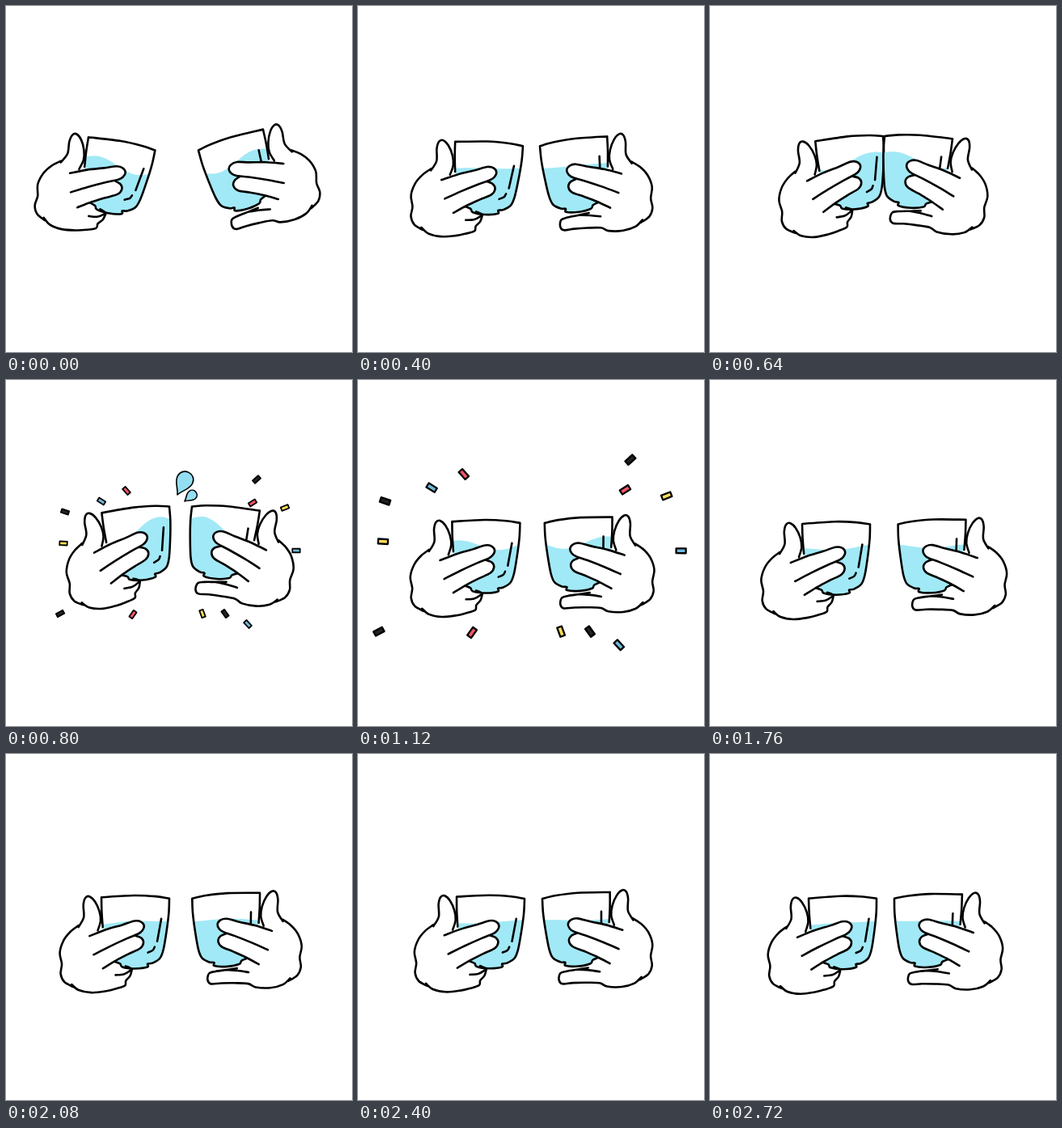
An HTML page with a canvas for the animation above (2800 ms loop, 428 by 428 pixels).

```html
<!DOCTYPE html>
<html lang="en">
<head>
<meta charset="utf-8">
<title>Cheers</title>
<style>
  html, body { margin: 0; width: 100%; height: 100%; overflow: hidden; background: #fff; }
  canvas { display: block; }
</style>
</head>
<body>
<canvas id="stage" width="428" height="428"></canvas>
<script>
const ctx = document.getElementById("stage").getContext("2d");
const LOOP = 2800, STEP = 80, HOLD = 160, CLINK = 640, SPLASH = 800;
const INK = "#000", WATER = "#a1e9f6";
const GLASS_WIDTH = 84;

// One hand and glass, mirrored for the other side.
// Origin: the rim corner nearest the middle of the stage; x runs outwards.
const rim = [0, 0, 17, -2.5, 44, -3.5, 84, -1];
const outerWall = [84, -1, 83, 17, 81, 36];
const innerWall = [66, 78, 58, 81, 55, 85, 40, 87, 24, 85, 24, 81, 18, 80, 9, 74, 5, 63, 2, 41, 0, 18, 0, 0];
const thumb = [111, 36, 105, 24, 106, 9, 104, 0, 99, -2, 92, 4, 86, 16, 84, 28, 87, 40];
const upperFinger = [97, 47, 77, 39, 57, 33, 42, 28, 34, 29, 30, 34, 32, 40, 37, 44, 51, 50, 72, 60, 91, 70];
const lowerFinger = [41, 46, 33, 49, 30, 55, 34, 62, 48, 69, 63, 77, 79, 87];
const palm = [74, 115, 92, 117, 108, 114, 117, 107];
const back = [115, 110, 126, 104, 131, 94, 130, 82, 133, 68, 129, 53, 121, 42, 111, 34];

const sides = [
  { dir: -1, lean: 0.03, tilt: a => a,
    crease: [63, 95, 53, 94, 46, 90, 44, 87, 51, 84],
    little: [43, 88, 45, 96, 50, 102, 51, 108, 62, 112],
    shine: [[9, 25, 13, 53], [16, 60, 18, 64, 24, 67]] },
  { dir: 1, lean: -0.03, tilt: a => 1.3 * a + 3.6,
    crease: [66, 96, 53, 93, 39, 91],
    little: [52, 90, 39, 91, 25, 92, 17, 94, 15, 102, 19, 107, 32, 107, 48, 108, 65, 110],
    shine: [[72, 22, 71, 40]] }
];

// Time, middle x, half of the gap between the glasses, rim height, outward tilt in degrees
const poses = [
  [HOLD, 211.2, 26.8, 178.5, 10.5],
  [400, 214.5, 10.5, 173.3, 3],
  [CLINK, 215, 1, 161, -5],
  [SPLASH, 216, 14, 156.5, -6],
  [1360, 215.5, 15.5, 181.5, 2],
  [1760, 215.3, 17.3, 178.5, -0.3],
  [2400, 217, 11, 179, 1],
  [LOOP, 217, 11, 178.7, -1]
];

const COLOURS = { r: "#f4586a", y: "#ffdc55", b: "#6fb9da", k: "#222" };
// Offsets from the centre of the burst
const bursts = [
  { until: 1360, colours: "bbkyyk", spots: [145, 1, 85, 92, 57, 79, 29, 79, -143, -8, -141, -47] },
  { until: 1280, colours: "rkbrkry", spots: [-57, 80, -147, 79, -96, -60, -65, -73, 96, -87, 91, -58, 131, -52] }
];

const mix = (a, b, k) => a + (b - a) * k;
const easeOut = (k, power) => 1 - (1 - k) ** power;
const radians = deg => deg * Math.PI / 180;

function poseAt(t) {
  const now = Math.max(t, HOLD);
  const next = Math.max(1, poses.findIndex(p => p[0] >= now));
  const a = poses[next - 1], b = poses[next];
  const k = (now - a[0]) / (b[0] - a[0]);
  const eased = a[0] === SPLASH ? easeOut(k, 2) : k;
  return a.map((v, i) => mix(v, b[i], eased));
}

// The water swings over before the splash, then rocks and dies away.
function waveAt(t) {
  const since = t - SPLASH;
  if (since < 0) return { height: mix(-8.5, 12.5, Math.max(0, t - HOLD) / (SPLASH - HOLD)), phase: 0 };
  return { height: 12.5 * Math.exp(-since / 590), phase: since / 560 * 1.5 * Math.PI };
}

// Smooth curve through every point, joined to the current path if asked.
function curve(p, join) {
  const n = p.length / 2;
  const at = i => { const j = 2 * Math.min(n - 1, Math.max(0, i)); return [p[j], p[j + 1]]; };
  ctx[join ? "lineTo" : "moveTo"](p[0], p[1]);
  for (let i = 0; i < n - 1; i++) {
    const [a, b, c, d] = [at(i - 1), at(i), at(i + 1), at(i + 2)];
    ctx.bezierCurveTo(b[0] + (c[0] - a[0]) / 6, b[1] + (c[1] - a[1]) / 6,
      c[0] - (d[0] - b[0]) / 6, c[1] - (d[1] - b[1]) / 6, c[0], c[1]);
  }
}

function stroke(lines) {
  ctx.beginPath();
  lines.forEach(line => curve(line));
  ctx.stroke();
}

function shape(parts) {
  ctx.beginPath();
  parts.forEach((part, i) => curve(part, i > 0));
  ctx.closePath();
}

function drawWater({ height, phase }) {
  ctx.beginPath();
  for (let x = -6; x <= GLASS_WIDTH + 6; x += 3) {
    const u = x / GLASS_WIDTH;
    const level = 27.5 + 5 * u - 0.35 * Math.abs(height);
    ctx.lineTo(x, level + height * Math.sin(5 * (u - 0.5) + phase));
  }
  ctx.lineTo(GLASS_WIDTH + 6, 95);
  ctx.lineTo(-6, 95);
  ctx.fillStyle = WATER;
  ctx.fill();
}

function drawSide(side, [, mid, gap, y, tilt], wave) {
  const glass = [rim, outerWall, innerWall];
  const hand = [thumb, upperFinger, lowerFinger, side.crease, [...side.little, ...palm], back];
  ctx.save();
  ctx.translate(mid + side.dir * gap, y);
  ctx.scale(side.dir, 1);
  ctx.rotate(radians(-side.tilt(tilt)));
  ctx.transform(1, 0, side.lean, 1, 0, 0);
  ctx.strokeStyle = INK;
  ctx.lineWidth = 2.6;

  ctx.save();
  shape(glass);
  ctx.clip();
  drawWater(wave);
  ctx.restore();
  stroke([...glass, ...side.shine]);

  ctx.fillStyle = "#fff";
  shape(hand);
  ctx.fill();
  stroke(hand);
  ctx.restore();
}

function drawConfetti(t) {
  if (t < 720 || t > 1360) return;
  const size = 0.84 + 0.46 * easeOut((t - 720) / 640, 3.2);
  ctx.save();
  ctx.translate(214, 210);
  ctx.scale(size, size);
  ctx.strokeStyle = INK;
  ctx.lineWidth = 1.8;
  for (const { until, colours, spots } of bursts) {
    if (t > until) continue;
    ctx.globalAlpha = t === until ? 0.5 : 1;
    [...colours].forEach((key, i) => {
      const x = spots[2 * i], y = spots[2 * i + 1];
      ctx.save();
      ctx.translate(x, y);
      ctx.rotate(Math.atan2(y, x));
      ctx.beginPath();
      ctx.rect(-4.7, -2.3, 9.4, 4.6);
      ctx.fillStyle = COLOURS[key];
      ctx.fill();
      ctx.stroke();
      ctx.restore();
    });
  }
  ctx.restore();
}

function drawDrop(x, y, length, angle) {
  ctx.save();
  ctx.translate(x, y);
  ctx.rotate(radians(angle));
  ctx.scale(length, length);
  ctx.beginPath();
  ctx.moveTo(0, 0);
  ctx.bezierCurveTo(-0.12, -0.3, -0.36, -0.42, -0.33, -0.7);
  ctx.bezierCurveTo(-0.3, -1.1, 0.3, -1.1, 0.33, -0.7);
  ctx.bezierCurveTo(0.36, -0.42, 0.12, -0.3, 0, 0);
  ctx.closePath();
  ctx.restore();
  ctx.fillStyle = "#94def2";
  ctx.fill();
  ctx.stroke();
}

function drawSplash(t) {
  if (t < 720 || t > 880) return;
  ctx.save();
  ctx.translate(0, (SPLASH - t) * 0.07);
  ctx.globalAlpha = t > SPLASH ? 0.5 : 1;
  ctx.strokeStyle = INK;
  ctx.lineWidth = 1.6;
  drawDrop(212, 142, 31, 27);
  drawDrop(221, 150, 18, 50);
  ctx.restore();
}

function draw(t) {
  const pose = poseAt(t), wave = waveAt(t);
  ctx.fillStyle = "#fff";
  ctx.fillRect(0, 0, 428, 428);
  ctx.lineCap = ctx.lineJoin = "round";
  drawConfetti(t);
  sides.forEach(side => drawSide(side, pose, wave));
  drawSplash(t);
}

const start = performance.now();
function tick() {
  const t = (performance.now() - start) % LOOP;
  draw(t < 240 ? 0 : Math.floor(t / STEP) * STEP);
  requestAnimationFrame(tick);
}
tick();
</script>
</body>
</html>
```
